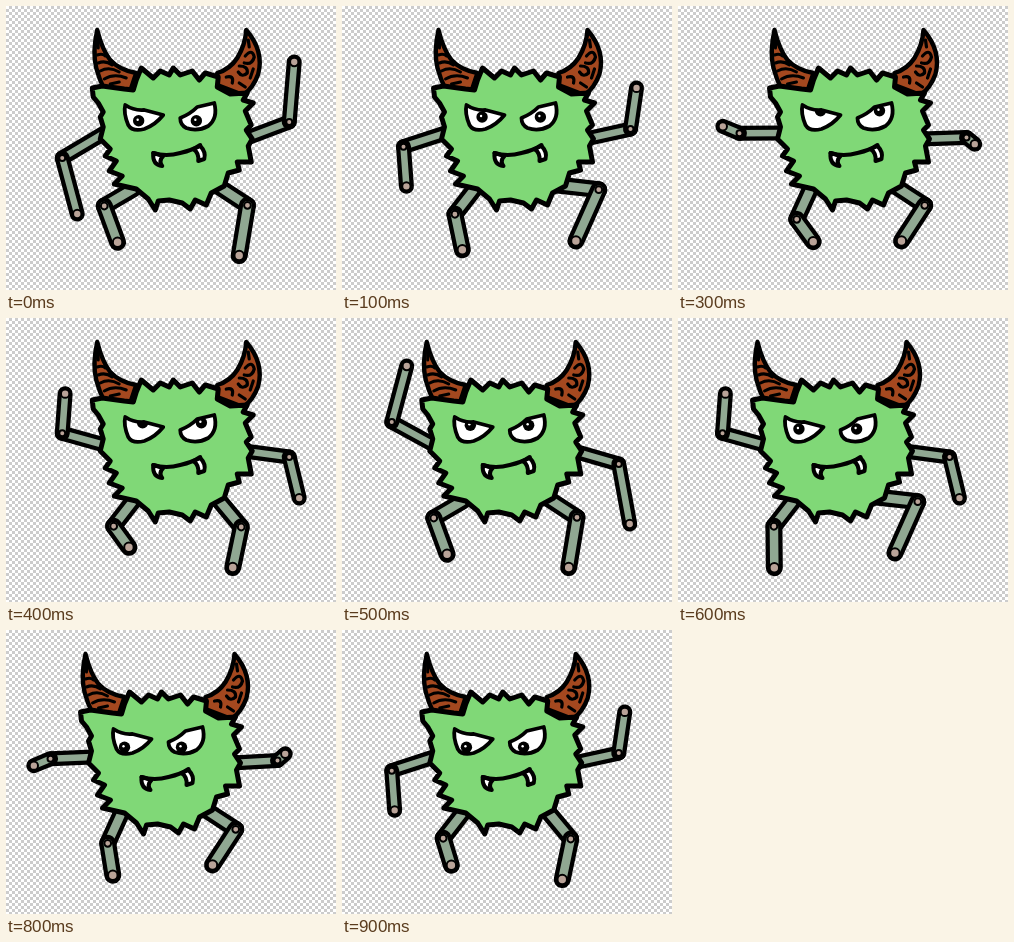
An HTML page for the animation above (1 s loop, 330 px wide and 284 px high).

```html
<!DOCTYPE html>
<html lang="en">
<head>
<meta charset="utf-8">
<title>Dancing monster</title>
<style>
html, body { margin: 0; width: 100%; height: 100%; overflow: hidden; background: #fff; }
svg { display: block; width: 330px; height: 284px; }
.ink { stroke: #000; stroke-linejoin: round; stroke-linecap: round; }
.line { fill: none; }
</style>
</head>
<body>
<svg viewBox="0 0 330 284">
  <defs>
    <pattern id="check" width="6" height="6" patternUnits="userSpaceOnUse">
      <path d="M0 0h6v6H0z" fill="#fff"/>
      <path d="M3 0h3v3H3zM0 3h3v3H0z" fill="#ccc" shape-rendering="crispEdges"/>
    </pattern>
    <path id="leftEye" d="M119 99Q128 105 138 104L157 109Q149 119 138 123Q126 126 122 119Q117 107 119 99Z"/>
    <path id="rightEye" d="M174 112Q184 108 191 101L208 97Q212 112 202 120Q191 126 180 122Q174 119 174 112Z"/>
    <clipPath id="leftLid"><use href="#leftEye"/></clipPath>
    <clipPath id="rightLid"><use href="#rightEye"/></clipPath>
  </defs>
  <rect width="330" height="284" fill="url(#check)"/>
  <g id="limbs"></g>
  <g id="body">
    <g class="ink" stroke-width="4.4">
      <path fill="#a4481f" d="M91 24Q86 46 90 62Q93 73 97 81L124 85L130 67Q113 64 104 54Q96 44 91 24Z"/>
      <path class="line" stroke-width="3" d="M92 33L92 42M91 49Q96 47 99 50M92 57Q99 54 106 59M94 65Q103 60 113 66M98 73Q108 67 120 72M104 78L113 76"/>
      <path fill="#a4481f" d="M240 24Q239 39 231 52Q224 63 211 67L211 79L237 89Q247 82 252 68Q258 45 240 24Z"/>
      <path class="line" stroke-width="3.2" d="M242 34L243 41M239 50Q246 42 248 51Q246 59 238 57M233 60Q242 60 241 67Q236 72 232 66M247 63L244 72M220 71Q228 69 226 77M233 77L239 81"/>
    </g>
    <path class="ink" fill="#80d877" stroke-width="5" d="M86 82L96 80L118 83L127 84L130 74L135 62L147 72L154 65L163 69L167 62L174 69L186 65L193 74L199 67L212 71L211 81L224 88L241 87L237 94L247 97L239 105L245 119L240 124L246 133L242 140L245 156L231 156L233 164L222 167L218 180L205 187L200 199L189 194L184 203L176 197L163 194L152 195L149 204L142 193L130 183L108 178L116 170L103 165L110 155L99 150L104 143L94 133L97 121L94 111L97 106L92 97L87 91Z"/>
    <g fill="#fff"><use href="#leftEye"/><use href="#rightEye"/></g>
    <g clip-path="url(#leftLid)"><g id="leftPupil"><circle r="5.7"/><circle cx="-1" cy="-1" r="1.2" fill="#fff"/></g></g>
    <g clip-path="url(#rightLid)"><g id="rightPupil"><circle r="5.7"/><circle cx="-1" cy="-1" r="1.2" fill="#fff"/></g></g>
    <g class="ink line" stroke-width="3.8"><use href="#leftEye"/><use href="#rightEye"/></g>
    <g class="ink" fill="#fff" stroke-width="4">
      <path d="M147 147Q146 159 156 160Q152 155 157 150Z"/>
      <path d="M187 143Q193 147 192 155L198 153Q200 146 194 140Z"/>
      <path class="line" d="M147 147Q160 151 174 147Q187 144 194 139"/>
    </g>
  </g>
</svg>
<script>
const STEPS = 10, STEP = 100;
const get = id => document.getElementById(id);

// Cosine in steps of the loop, peaking at the given step.
const swing = (i, peak, turns = 1) => Math.cos(2 * Math.PI * turns * (i - peak) / STEPS);

function arms(i) {
  const c = swing(i, 0);
  const lift = c * Math.abs(c);
  const bend = c ** 3;
  return [
    { root: [98, 127], mid: [56, 128 + 24 * bend], end: [36 + 35 * Math.abs(lift), 128 + 80 * lift], width: 15 },
    { root: [238, 133], mid: [283, 131 - 15 * bend], end: [291 - 3 * lift, 131 - 75 * lift], width: 15 }
  ];
}

// Each foot makes two steps per loop; the left one also leans with the sway.
function legs(i) {
  const side = swing(i, 2.5);
  const stride = Math.abs(side);
  const knee = swing(i, 4, 2);
  return [
    { root: [127, 183], mid: [98 + 16 * stride, 200 + 14 * stride],
      end: [117 + 6 * side + 7 * swing(i, 3, 2), 241 - 5 * side + 9 * swing(i, 1.7, 2)], width: 17 },
    { root: [210, 179], mid: [244 - 9 * knee, 195 + 14 * knee],
      end: [225 + 8 * swing(i, 0.1, 2), 239 + 13 * swing(i, 4.5, 2)], width: 17 }
  ];
}

function segment(p, q, width) {
  const d = `M${p}L${q}`;
  return `<path class="ink" d="${d}" stroke-width="${width}"/>` +
    `<path class="ink" d="${d}" style="stroke:#90a892" stroke-width="${width - 8.5}"/>`;
}

const pad = ([x, y], r) =>
  `<circle class="ink" cx="${x}" cy="${y}" r="${r}" fill="#b9a398" stroke-width="2"/>`;

const limb = ({ root, mid, end, width }) =>
  segment(root, mid, width) + segment(mid, end, width) +
  pad(mid, width / 5) + pad(end, width / 3.6);

const place = (id, x, y) => get(id).setAttribute("transform", `translate(${x} ${y})`);

let shown = -1;
function draw(time) {
  const i = Math.floor(time / STEP) % STEPS;
  if (i === shown) return;
  shown = i;
  const sway = -3 - 10.5 * swing(i, 7);
  const gaze = swing(i, 8);
  const drop = 111 + 6.5 * swing(i, -1.5);
  get("limbs").innerHTML = [...arms(i), ...legs(i)].map(limb).join("");
  place("limbs", sway, 0);
  place("body", sway, 0);
  place("leftPupil", 133.5 - 3.5 * gaze, drop);
  place("rightPupil", 191.5 - 4.5 * gaze, drop);
}

const begin = performance.now();
function tick() {
  draw(performance.now() - begin);
  requestAnimationFrame(tick);
}
tick();
</script>
</body>
</html>
```
